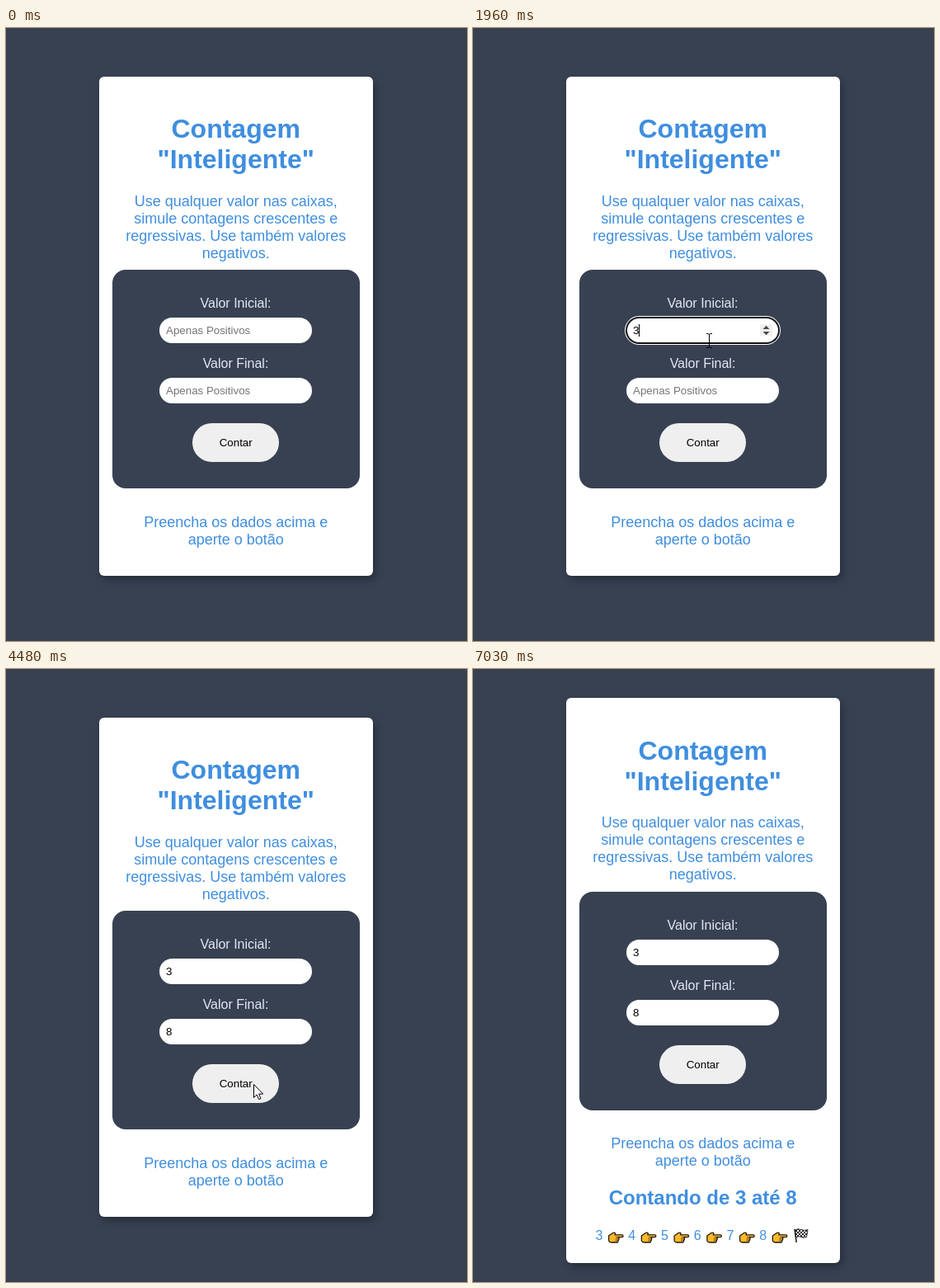
Write an HTML page that moves like this. It is 559 by 743 pixels and loops after 8 s.

```html
<!DOCTYPE html>
<html lang="pt-BR">
<head>
<meta charset="utf-8">
<title>Contagem</title>
<style>
  html, body { margin: 0; width: 100%; height: 100%; overflow: hidden; background: #374152; }
  svg { display: block; width: 559px; height: 743px; font-family: "Liberation Sans", Arial, sans-serif; }
  text { fill: #3f8edf; }
  .mid { text-anchor: middle; }
  .h1 { font-size: 32px; font-weight: bold; }
  .h2 { font-size: 24px; font-weight: bold; }
  .p { font-size: 18px; }
  .row { font-size: 16px; }
  .label { font-size: 16px; fill: #e3e8f2; }
  .field { font-size: 13.333px; fill: #000; }
  .hint { font-size: 13.333px; fill: #757575; }
  #card { fill: #fff; filter: drop-shadow(3px 5px 5px rgba(0, 0, 0, .28)); }
</style>
</head>
<body>
<svg viewBox="0 0 559 743">
  <defs>
    <g id="spinner">
      <rect x="162" y="8" width="15" height="14" fill="#efefef"/>
      <path d="M165.5 14L169.5 9.8L173.5 14ZM165.5 17L169.5 21.2L173.5 17Z" fill="#4a4a4a"/>
    </g>
    <g id="ring">
      <rect x="-2" y="-2" width="189" height="35" rx="17.5" fill="#fff"/>
      <rect x="-1" y="-1" width="187" height="33" rx="16.5" fill="#101010"/>
      <rect x="1" y="1" width="183" height="29" rx="14.5" fill="#fff"/>
    </g>
    <g id="hand" stroke="#231a10" stroke-linejoin="round">
      <path d="M1 5L6 1.5Q8 .5 9 2L8.5 3.8H17Q18.5 3.8 18.5 5.2T17 6.7H12.5Q14 7.4 13.2 8.7Q13.7 9.8 12.5 10.6Q12.7 12.6 11 13H4Q2 13 1 11Z" fill="#fcb928" stroke-width="1.3"/>
      <path d="M9.5 6.7H13M9 8.8H13M9 10.8H12.3" fill="none" stroke-width=".7"/>
    </g>
    <pattern id="checks" width="4" height="4" patternUnits="userSpaceOnUse">
      <rect width="4" height="4" fill="#f4f4f4"/>
      <path d="M0 0H2V4H4V2H0Z" fill="#222"/>
    </pattern>
  </defs>

  <rect id="card" x="113" y="59" width="332" height="605" rx="6"/>

  <g class="near mid h1">
    <text x="278.7" y="133">Contagem</text>
    <text x="278.7" y="170">"Inteligente"</text>
  </g>
  <g class="far mid p">
    <text x="278.8" y="216">Use qualquer valor nas caixas,</text>
    <text x="278.8" y="237">simule contagens crescentes e</text>
    <text x="278.8" y="258">regressivas. Use também valores</text>
    <text x="278.8" y="279">negativos.</text>
    <text x="278.8" y="605">Preencha os dados acima e</text>
    <text x="278.8" y="626">aperte o botão</text>
  </g>

  <g class="near">
    <rect x="129" y="293" width="300" height="265" rx="16" fill="#374152"/>
    <text class="label mid" x="278.5" y="339">Valor Inicial:</text>
    <text class="label mid" x="278.5" y="412">Valor Final:</text>
    <g id="fields"></g>
    <rect x="226" y="479" width="105" height="47" rx="23.5" fill="#efefef"/>
    <text class="field mid" x="278.7" y="507">Contar</text>
  </g>

  <g id="result">
    <text class="h2 mid" x="278.7" y="649">Contando de 3 até 8</text>
    <g id="steps" class="row"></g>
    <g transform="translate(389 678)">
      <path d="M1.5 2Q5 -.3 9 1.5T17 1.5L15.5 10.5Q12 12 9 10.5T2.5 11Z" fill="url(#checks)" stroke="#222" stroke-width=".9"/>
      <path d="M1 .8L3.2 17" stroke="#222" stroke-width="1.6"/>
    </g>
  </g>

  <circle id="glow" r="12" fill="#f0f000" opacity=".7"/>
  <g id="cursor">
    <path id="beam" d="M-3 -8.5H-1L.5 -7.5L2 -8.5H4M-3 8.5H-1L.5 7.5L2 8.5H4M.5 -8V8" fill="none" stroke="#000"/>
    <path id="arrow" d="M.5 .5V16.5L4.2 13L6.6 18.6L9 17.6L6.6 12.1H11.6Z" fill="#fff" stroke="#000"/>
  </g>
</svg>
<script>
  const LOOP = 8000, DONE = 4670;
  const $ = id => document.getElementById(id);
  const show = (id, on) => $(id).style.display = on ? '' : 'none';
  const within = (t, a, b) => t >= a && t < b;

  const fields = [
    { y: 351, value: 3, focus: 1330, typed: 1580, blur: 2470 },
    { y: 424, value: 8, focus: 2470, typed: 3590, blur: 4430 }
  ];
  const clicks = [[1290, 1350], [2470, 2490], [4390, 4450]];

  const smooth = u => u * u * (3 - 2 * u);
  const moves = [
    { a: 50, b: 1270, from: [536, 745], to: [284, 376], ease: u => 1 - (1 - u) ** 1.7 },
    { a: 1900, b: 2360, from: [284, 376], to: [322, 436], ease: smooth },
    { a: 3780, b: 4380, from: [322, 437], to: [300, 503], ease: smooth },
    { a: 6400, b: 7030, from: [300, 503], to: [-14, 286], ease: u => u ** 1.5 }
  ];

  $('fields').innerHTML = fields.map((f, i) => `
    <g transform="translate(186 ${f.y})">
      <rect width="185" height="31" rx="15.5" fill="#fff"/>
      <use id="ring${i}" href="#ring"/>
      <text id="hint${i}" class="hint" x="8" y="20">Apenas Positivos</text>
      <text id="value${i}" class="field" x="8" y="20">${f.value}</text>
      <rect id="caret${i}" y="8" width="1" height="15"/>
      <use id="spin${i}" href="#spinner"/>
    </g>`).join('');

  $('steps').innerHTML = [3, 4, 5, 6, 7, 8].map((n, i) => {
    const x = 148.6 + i * 39.75;
    return `<text x="${x}" y="692">${n}</text><use href="#hand" x="${x + 15}" y="682"/>`;
  }).join('');

  function cursorAt(t) {
    const m = moves.filter(m => t >= m.a).pop() || moves[0];
    const k = m.ease(Math.min(1, Math.max(0, (t - m.a) / (m.b - m.a))));
    return m.from.map((v, i) => Math.round(v + (m.to[i] - v) * k));
  }

  function draw() {
    const t = performance.now() % LOOP;
    const done = t >= DONE;
    const [x, y] = cursorAt(t);

    $('card').setAttribute('y', done ? 35 : 59);
    $('card').setAttribute('height', done ? 685 : 605);
    for (const [name, dy] of [['near', -23], ['far', -24]])
      for (const el of document.getElementsByClassName(name))
        el.setAttribute('transform', `translate(0 ${done ? dy : 0})`);
    show('result', done);

    let beam = false;
    fields.forEach((f, i) => {
      const top = f.y - (done ? 23 : 0);
      const hover = within(x, 186, 371) && within(y, top, top + 31);
      const focus = within(t, f.focus, f.blur);
      const typed = t >= f.typed;
      const blink = (t - (typed ? f.typed : f.focus)) % 1070 < 535;
      beam = beam || hover;
      show('ring' + i, focus);
      show('hint' + i, !typed);
      show('value' + i, typed);
      show('caret' + i, focus && blink);
      $('caret' + i).setAttribute('x', typed ? 15 : 8);
      show('spin' + i, hover || focus);
    });

    show('cursor', !within(t, 1580, 1900) && within(t, 50, 7030));
    show('beam', beam);
    show('arrow', !beam);
    $('cursor').setAttribute('transform', `translate(${x} ${y})`);
    show('glow', clicks.some(c => within(t, ...c)));
    $('glow').setAttribute('transform', `translate(${x - 2} ${y - 2})`);
    requestAnimationFrame(draw);
  }
  draw();
</script>
</body>
</html>
```
